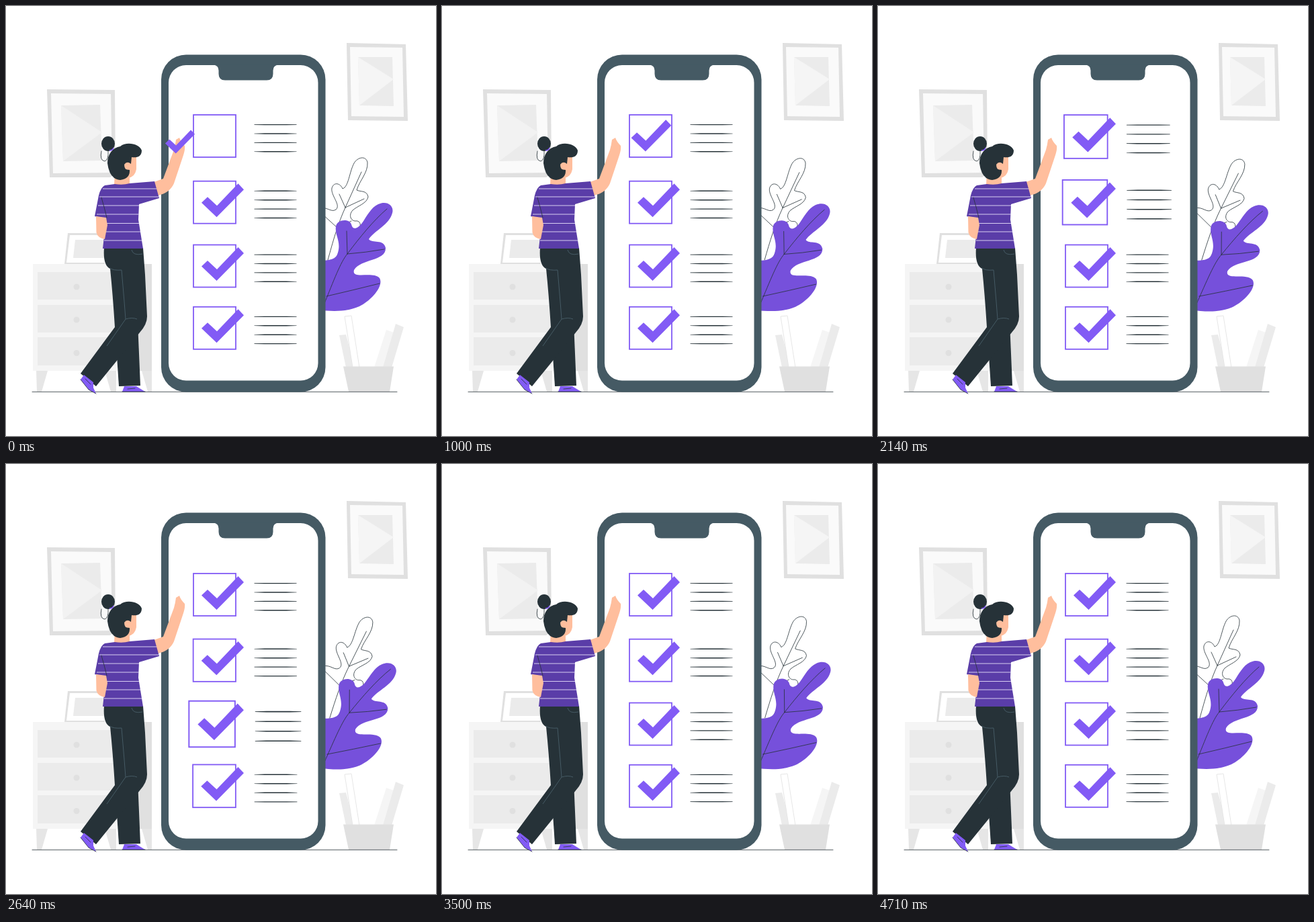
These frames come from a looping animation (640 px wide and 640 px high, 4780 ms). An HTML page:

```html
<!DOCTYPE html>
<html>
<head>
<meta charset="utf-8">
<style>
html, body { margin: 0; height: 100%; overflow: hidden; background: #fff; }
svg { display: block; width: 100vw; height: 100vh; }
.thin { fill: none; stroke: #263238; stroke-width: .8; stroke-linecap: round; }
</style>
</head>
<body>
<svg viewBox="0 0 640 640">
  <defs>
    <path id="tick" fill="#825bf5" d="M-31.5 3.5-22.5-5-8.5 8 23-25 31.5-16-9 25Z"/>
    <g id="lines" fill="#263238">
      <path id="rule" d="M14.500-17.200 30-17.600H62L77.500-17.200V-16.600L62-16.200H30L14.500-16.600Z"/>
      <use href="#rule" y="13.4"/>
      <use href="#rule" y="26.8"/>
      <use href="#rule" y="40.2"/>
    </g>
  </defs>

  <g id="pictures">
    <path fill="#e0e0e0" d="M61 124 162 125 163 250 155 255 65 255Z"/>
    <path fill="#fafafa" d="M67 130 156 131 158 248 70 249Z"/>
    <path fill="#ebebeb" d="M82 148 140 147 143 230 85 231Z"/>
    <path fill="#f2f2f2" d="M82 148 143 188 85 231Z"/>
    <path fill="#e0e0e0" d="M507 55 595 57 598 171 509 170Z"/>
    <path fill="#fafafa" d="M512 61 590 62 592 165 514 164Z"/>
    <path fill="#ebebeb" d="M524 76 575 76 577 149 526 148Z"/>
    <path fill="#f5f5f5" d="M524 76 577 109 526 148Z"/>
  </g>

  <g id="cabinet">
    <path fill="#e0e0e0" d="M92 338H147V384H87Z"/>
    <path fill="#fff" d="M95 341H147V382H90Z"/>
    <path fill="#ebebeb" d="M103 348H147V375H100Z"/>
    <path fill="#e6e6e6" d="M45 543H62L53 574H46ZM147 543H164V574H156ZM202 543H217V574H211Z"/>
    <path fill="#f5f5f5" d="M40 384H170V543H40Z"/>
    <path fill="#e0e0e0" d="M170 384H217V543H170Z"/>
    <path fill="#ebebeb" d="M47 396H163V437H47ZM47 445H163V486H47ZM47 493H163V535H47Z"/>
    <g fill="#e0e0e0"><circle cx="105" cy="418" r="4.5"/><circle cx="105" cy="467" r="4.5"/><circle cx="105" cy="516.5" r="4.5"/></g>
  </g>

  <g id="pot">
    <path fill="#ebebeb" d="M496 490 506 489 519 538H506Z"/>
    <path fill="#fff" stroke="#e6e6e6" d="M504 462 514 461 526 538H516Z"/>
    <path fill="#f5f5f5" d="M566 482 577 486 562 538H548Z"/>
    <path fill="#ebebeb" d="M580 473 592 478 574 538H561Z"/>
    <path fill="#e0e0e0" d="M502 536.500H577L571 574H510Z"/>
  </g>

  <g id="plant">
    <path class="thin" style="fill:#fff" d="M466 395V301C478 298 484 308 491 303 499 296 483 282 485 271 488 261 498 264 501 272 510 269 511 247 518 234 523 225 536 222 538 233 539 248 526 260 522 274 528 277 537 274 539 284 537 294 524 297 516 304 509 312 514 320 520 320 526 319 528 324 527 328 523 340 505 345 496 365L482 395Z"/>
    <path class="thin" d="M479 378C487 349 494 324 505 300L529 247M505 300 496 280M505 300 533 287M493 330 470 309M493 330 514 320"/>
    <path fill="#7650db" d="M466 379C482 379 492 377 494 367 499 350 489 341 491 328 493 317 511 316 514 325 516 334 523 332 530 323 537 313 543 300 554 295 567 289 578 297 575 308 571 325 549 334 540 347 545 354 562 346 565 360 566 380 528 376 518 393 514 408 546 394 556 405 563 417 543 439 526 447 505 456 486 454 466 453Z"/>
    <path class="thin" d="M473 445C488 408 498 381 508 369 526 345 547 319 567 302M508 369 507 335M508 369Q535 367 563 362M477 432Q516 423 556 413"/>
  </g>

  <path class="thin" d="M39 574.300H582"/>
  <rect x="231" y="72.5" width="244.5" height="502" rx="37" fill="#455a64"/>
  <rect x="242" y="88" width="222.5" height="469.5" rx="26" fill="#fff"/>
  <path fill="#455a64" d="M308 87.500Q316.500 88 316.500 96V101Q316.500 110.500 326 110.500H388Q397.500 110.500 397.500 101V96Q397.500 88 406 87.500Z"/>

  <g id="rows"></g>

  <g id="woman">
    <g fill="#ffbe9d">
      <path d="M220 262 234 257 250 214Q252 207 253 199L258 196Q260 202 266 208 267 214 263 225L250 264Q244 278 226 282Z"/>
      <path d="M162 246H184V267H161Z"/>
      <path d="M176 220H194L194 243Q192 255 181 256L172 246Z"/>
    </g>
    <g fill="#263238">
      <ellipse cx="152" cy="205" rx="10" ry="11"/>
      <path d="M151 234C151 220 159 211 170 209 179 201 199 205 202 215 202 225 194 226 187 225L186 235Q180 230 176 236 176 243 184 244 185 257 170 259 154 258 151 234Z"/>
      <path d="M163 490 196 470 200 565 168 566Z"/>
      <path d="M146 360H204L207 400 210 462Q210 474 199 486L134 566 111 547 162 478Q159 430 155 391 144 386 146 360Z"/>
    </g>
    <path class="thin" d="M142 216Q139 230 147 231 153 229 152 216"/>
    <path fill="none" stroke="#825bf5" stroke-width="1.5" d="M154 215Q159 215 160 211"/>
    <circle cx="181" cy="239" r="4.5" fill="#ffbe9d"/>
    <path fill="none" stroke="#455a64" d="M154 390Q160 394 172 393L176 440 178 466Q188 463 195 466M178 466 150 506M187 363Q189 372 203 369"/>
    <path id="shirt" fill="#5a3da8" d="M147 267 162 265Q174 267 184 264L221 261 228 286 198 295 197 318 204 361H144L149 316 132 313 138 282Q141 270 147 267Z"/>
    <path fill="none" stroke="#d8cff2" stroke-width="1.2" d="M144 272H224M139 284H227M137 297H198M135 310H198M150 323.500H198M147 336H200M146 349H202"/>
    <path fill="#ffbe9d" d="M134 313 149 315 151 326 147 347Q136 345 134.500 337Z"/>
    <path class="thin" d="M142 285Q147 302 150 315"/>
    <g fill="#825bf5">
      <path d="M116 549 130 560 130 568 134 577 123 571 111 556Z"/>
      <path d="M176 566H194L207 574H173Z"/>
    </g>
    <path class="thin" d="M111 556 123 571 134 577M118 555 126 563M173 574H207M181 570 192 569"/>
  </g>

  <use id="flying" href="#tick"/>
</svg>
<script>
const LOOP = 4780, PULSE = 485;
const $ = id => document.getElementById(id);
const clamp = v => Math.max(0, Math.min(1, v));
const mix = (a, b, p) => a + (b - a) * p;

const rows = [193.5, 292.2, 387, 479.3].map((y, i) => {
  const el = document.createElementNS("http://www.w3.org/2000/svg", "g");
  el.innerHTML = `<rect x="-76" y="-31.5" width="63" height="63" fill="none" stroke="#825bf5" stroke-width="1.8"/>
    <use href="#lines"/>` + (i ? '<use href="#tick" x="-32.5" y="-3"/>' : "");
  $("rows").append(el);
  return { el, y, peak: 1910 + 350 * i };
});

function draw(t) {
  const sway = 1.05 * (1 - Math.cos(2 * Math.PI * t / LOOP));
  $("plant").setAttribute("transform", `rotate(${sway} 475 455)`);

  const settle = clamp((t - 1430) / 360);
  const transforms = rows.map(({ el, y, peak }, i) => {
    const scale = 1 + 0.1 * clamp(1 - Math.abs(t - peak) / PULSE) ** 2;
    const place = `translate(355 ${i ? y : y + settle}) scale(${scale})`;
    el.setAttribute("transform", place);
    return place;
  });

  // The first tick flies from the hand into its box, then pulses with the row.
  const fly = Math.sin(Math.PI / 2 * clamp(t / 1380)) ** 2;
  const x = mix(-96, -32.5, fly), y = mix(8.5, -2.5, fly);
  $("flying").setAttribute("transform",
    `${transforms[0]} translate(${x} ${y}) scale(${mix(0.7, 1, fly)})`);
}

const start = performance.now();
function tick() {
  draw((performance.now() - start) % LOOP);
  requestAnimationFrame(tick);
}
tick();
</script>
</body>
</html>
```
